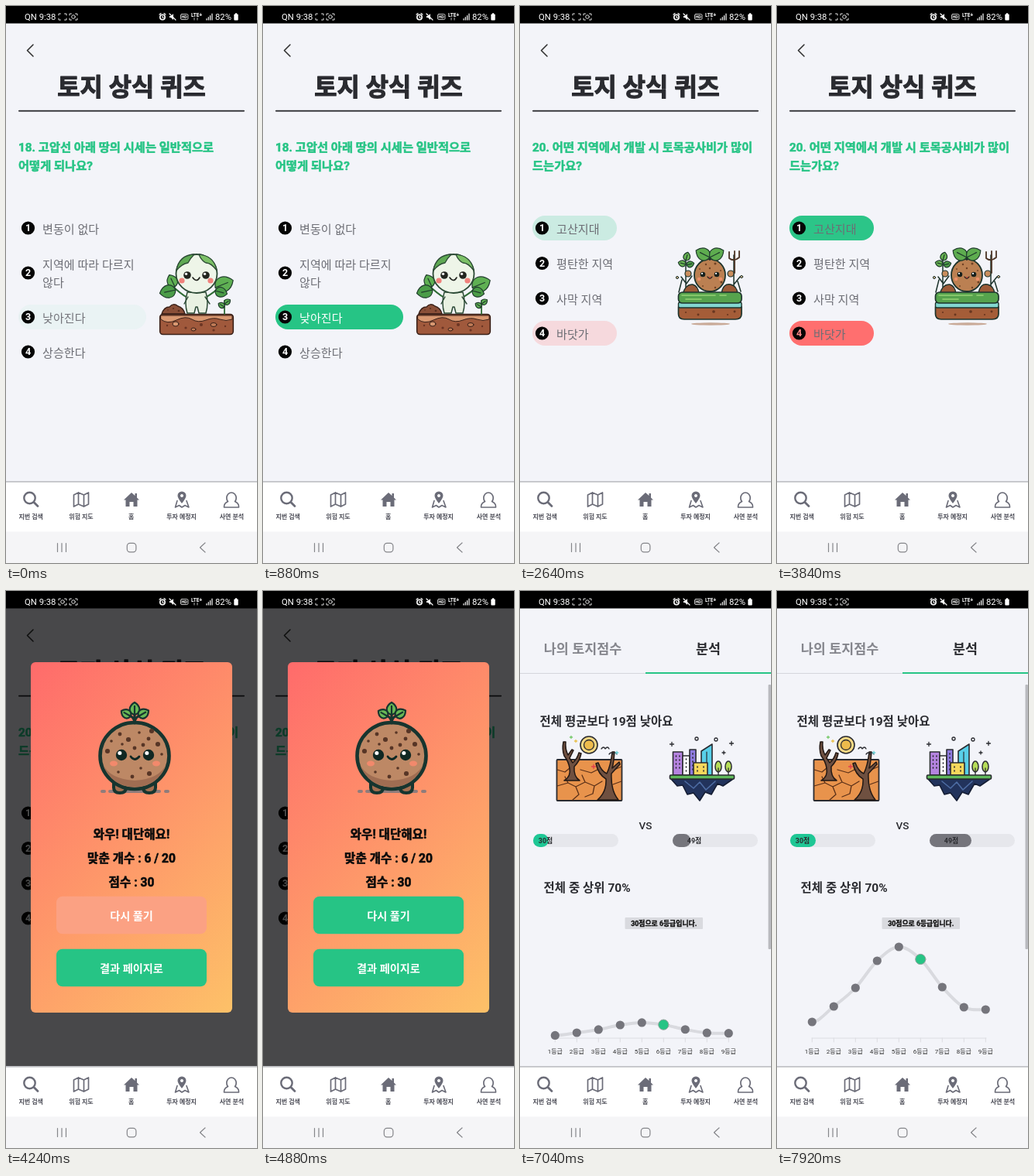
Write an HTML page that moves like this. It is 324x720 px and loops after 8 s.

```html
<!DOCTYPE html>
<html lang="ko">
<head>
<meta charset="utf-8">
<title>토지 상식 퀴즈</title>
<style>
html,body{margin:0;width:100%;height:100%;overflow:hidden;background:#f3f4f9}
svg{display:block;width:100vw;height:100vh}
text{font-family:Roboto,"Noto Sans CJK KR","Noto Sans CJK",sans-serif;white-space:pre}
</style>
</head>
<body>
<svg id="stage" viewBox="0 0 324 720"></svg>
<script>
const GREEN = '#26c485', RED = '#ff6b6b', TEAL = '#1ec795', INK = '#2a2b30', GRAY = '#75757c', BARK = '#3a2119', PINE = '#17352f';
const LOOP = 8000, FADE = 200;
const MODAL_AT = 3920, RESULT_AT = 5200, ANALYSIS_AT = 7000;

const clamp = v => Math.max(0, Math.min(1, v));
const ramp = (t, from, len) => clamp((t - from) / len);
const mix = (a, b, k) => `rgb(${a.map((v, i) => Math.round(v + (b[i] - v) * k))})`;
const $ = id => document.getElementById(id);

// Markup helpers
const paint = (fill, stroke, w) => `fill="${fill || 'none'}"` +
  (stroke ? ` stroke="${stroke}" stroke-width="${w || 1}" stroke-linecap="round" stroke-linejoin="round"` : '');
const path = (d, fill, stroke, w, extra = '') => `<path d="${d}" ${paint(fill, stroke, w)} ${extra}/>`;
const dot = (x, y, r, fill, stroke, w, extra = '') => `<circle cx="${x}" cy="${y}" r="${r}" ${paint(fill, stroke, w)} ${extra}/>`;
const oval = (x, y, rx, ry, fill, stroke, w) => `<ellipse cx="${x}" cy="${y}" rx="${rx}" ry="${ry}" ${paint(fill, stroke, w)}/>`;
const box = (x, y, w, h, r, fill, stroke, sw, extra = '') =>
  `<rect x="${x}" y="${y}" width="${w}" height="${h}" rx="${r}" ${paint(fill, stroke, sw)} ${extra}/>`;
const group = (id, inner, extra = '') => `<g id="${id}" ${extra}>${inner}</g>`;
// Text placed by the vertical middle of its glyphs; weight 800 is bold thickened with a thin outline
const text = (x, mid, s, size, weight, fill, anchor = 'start', extra = '') =>
  `<text x="${x}" y="${mid + size * .38}" font-size="${size}" font-weight="${Math.min(weight, 700)}" text-anchor="${anchor}" ` +
  (fill ? paint(fill, weight === 800 && fill, size * .035) : '') + ` ${extra}>${s}</text>`;
const leaf = (x, y, l, angle, fill, stroke = '#1f3b2c', w = 1.2) =>
  `<g transform="translate(${x} ${y}) rotate(${angle})">` +
  path(`M0 0C${l * .15} ${-l * .55} ${l * .7} ${-l * .5} ${l} 0C${l * .7} ${l * .5} ${l * .15} ${l * .55} 0 0M0 0H${l * .7}`, fill, stroke, w) + '</g>';
const eye = (x, y, r, ink) => dot(x, y, r, ink) + dot(x - r * .3, y - r * .35, r * .35, '#fff');
const specks = (list, r, fill) => list.map(([x, y], i) => dot(x, y, r * (1 + i % 3 * .35), fill)).join('');
const spark = (x, y, r, c) => path(`M${x - r} ${y}h${2 * r}M${x} ${y - r}v${2 * r}`, '', c, 1.3);

// Characters
const leafyKid =
  path('M201 398Q204 389 211 389Q216 383 222 388Q229 390 231 398Z', '#8a4f38', BARK, 1.4) +
  specks([[209, 393], [216, 391], [223, 394]], .8, '#5a2f20') +
  box(198.7, 398.5, 94.6, 26, 4, '#a0593c', BARK, 1.6) +
  path('M200 400H292V405Q284 408 276 405T258 406T240 405T220 406T200 405Z', '#d99871', BARK, 1) +
  specks([[208, 413], [232, 416], [252, 412], [283, 414], [268, 419]], 1.2, '#6b3524') +
  oval(219, 411, 4, 3, '#d99871', BARK) + oval(268, 412, 4, 2.5, '#c27c57', BARK) + oval(242, 418, 3, 2, '#c27c57', BARK) +
  path('M282 398V381', '', '#2f6b35', 1.8) + leaf(282, 389, 9, -150, '#5fb053') + leaf(282, 385, 9, -35, '#5fb053') +
  path('M234 377Q224 371 214 361M257 377Q268 371 277 362', '', '#2f6b35', 2) +
  leaf(218, 363, 17, -115, '#5fb053') + leaf(219, 367, 21, 168, '#4b9c48') +
  leaf(270, 364, 25, -22, '#5fb053') + leaf(270, 368, 16, 15, '#4b9c48') +
  path('M234 370Q230 384 234 397H243L245 389H247L249 397H258Q262 384 258 370Z', '#e9f1e2', '#2c4a35', 1.5) +
  path('M235 376L230 385M257 376L263 385', '', '#2c4a35', 1.4) +
  oval(246, 346, 26.5, 25, '#eef5e8', '#2c4a35', 1.8) +
  path('M220 342Q223 322 243 321Q238 326 235 332Q227 333 220 342Z', '#5fa954', '#2c4a35', 1.3) +
  path('M249 321Q269 323 272 342Q265 332 258 332Q252 329 249 321Z', '#7cc067', '#2c4a35', 1.3) +
  eye(234, 348, 4.8, '#22251f') + eye(258, 348, 4.8, '#22251f') +
  dot(227, 355, 3.6, '#f0827c') + dot(264, 355, 3.6, '#f0827c') + path('M241 351Q246 358 250 351', '', '#22251f', 1.6);

const earthKid =
  path('M233 361Q224 356 215 341M257 361Q268 356 276 341', '', '#4a3524', 1.5) +
  leaf(222, 334, 17, -139, '#49a39a') + leaf(222, 348, 17, -160, '#55b06c') +
  leaf(267, 333, 20, -40, '#c47a43') + leaf(268, 348, 17, -25, '#49a39a') +
  path('M210 380Q206 400 218 400.5H272Q286 400 281 380Z', '#8b4a30', BARK, 1.6) +
  oval(222, 389, 5, 3.5, '#b9744e', BARK) + oval(262, 385, 5, 3.5, '#c98a62', BARK) + oval(244, 393, 4, 2.5, '#b9744e', BARK) +
  specks([[233, 387], [252, 394], [272, 392], [215, 395]], 1, '#4f2618') +
  path('M207 374Q207 368 213 368H277Q283 368 283 374Q284 383 277 380Q272 376 267 381Q261 385 256 379Q249 376 244 381Q237 385 232 379Q226 376 221 381Q207 386 207 374Z', '#69bd4d', '#24401f', 1.5) +
  path('M211 371H275', '', '#a2dc73', 1.6) +
  path('M234 355V368H242V364H247V368H255V355Z', '#d9a47b', BARK, 1.4) + path('M233 358L227 363M256 358L262 363', '', BARK, 1.5) +
  box(226, 323.5, 38, 34, 15, '#e8b990', BARK, 1.6) +
  specks([[233, 331], [256, 329], [245, 327], [259, 350]], .7, '#b07d57') +
  eye(235, 341, 3.4, '#23170f') + eye(254, 341, 3.4, '#23170f') +
  dot(231, 347, 2.5, '#ef9a78') + dot(259, 347, 2.5, '#ef9a78') + path('M241 344Q245 349 248 344', '#933', '#23170f', 1.2);

const spudKid =
  oval(246, 411, 25, 1.7, '#c9aa98') +
  path('M214 372V326M208 350L214 358M222 349L214 360M276 372V322M284 350L276 360M205 370L209 354M285 369L281 356', '', '#1d332c', 1.5) +
  leaf(214, 334, 10, -165, '#69b552') + leaf(214, 329, 11, -75, '#69b552') + leaf(215, 335, 10, -15, '#4d9d48') +
  path('M270 318V326Q276 331 283 325V317M277 317V345', '', '#4b3324', 1.8) +
  dot(217, 346, 4, '#c98d5d', '#1d332c', 1.2) + dot(272, 346, 4, '#c98d5d', '#1d332c', 1.2) +
  dot(203, 351, 1.6, '#d8b793', '#1d332c') + dot(286, 350, 1.6, '#d8b793', '#1d332c') +
  path('M210 372Q214 359 223 360Q230 362 231 372ZM260 372Q262 358 272 360Q280 362 281 372Z', '#9c5a38', '#1d332c', 1.4) +
  oval(245, 348, 20, 21, '#bb8052', '#1d332c', 1.8) +
  specks([[232, 340], [240, 334], [252, 333], [259, 342], [245, 339], [260, 357], [236, 362], [252, 364]], .9, '#704225') +
  eye(236, 347, 3.3, '#18211d') + eye(254, 347, 3.3, '#18211d') +
  dot(231, 353, 2.3, '#ec8f69') + dot(259, 353, 2.3, '#ec8f69') + path('M242 350Q245 355 248 350', '#b04b3d', '#18211d', 1.2) +
  path('M245 328V321', '', '#1d332c', 2) + leaf(245, 325, 20, -153, '#5eac4f') + leaf(245, 325, 20, -27, '#5eac4f') +
  path('M204.5 389H286V398Q286 405 278 405H212Q204.5 405 204.5 398Z', '#a55d38', '#1d332c', 1.7) +
  specks([[214, 396], [230, 399], [250, 395], [268, 399], [277, 395]], 1.1, '#683620') +
  box(204.5, 383, 81.5, 7, 2, '#83d8d0', '#1d332c', 1.4) +
  box(204.5, 370, 81.5, 14, 5, '#56a34d', '#1d332c', 1.7) + path('M209 374H252M258 374H266M214 379H234', '', '#95d274', 1.6);

const trophyKid =
  path('M124 259H127M134 259H198M206 259H209', '', '#8f7c7b', 4) +
  path('M139 240V254Q139 261 147 261Q155 261 155 254V240ZM177 240V254Q177 261 185 261Q193 261 193 254V240Z', '#a36e50', PINE, 4) +
  oval(166, 213, 44.5, 43, '#bd8865', PINE, 4.6) +
  path('M125 224Q136 253 166 253.5Q196 253 207 224Q198 243 166 245Q134 243 125 224Z', '#a06d52') +
  specks([[136, 194], [147, 185], [158, 192], [172, 183], [184, 191], [196, 198], [150, 198], [177, 199], [131, 207], [201, 211], [166, 203], [188, 181], [145, 234], [163, 240], [185, 236], [174, 229]], 1.8, '#573526') +
  eye(149, 212, 7.2, '#102823') + eye(184, 212, 7.2, '#102823') +
  oval(139, 223, 5, 3.4, '#f2896c') + oval(194, 223, 5, 3.4, '#f2896c') + path('M161 214Q166 221 172 214', '', '#102823', 2.8) +
  path('M166 171V158M166 169Q164 162 159 161M166 169Q168 162 173 161', '', PINE, 3.2) +
  leaf(166, 160, 16, -90, '#68b956', PINE, 2.2) + leaf(161, 162, 14, -150, '#68b956', PINE, 2.2) + leaf(171, 162, 15, -30, '#68b956', PINE, 2.2);

const seedling =
  oval(162, 254.5, 17, 6, '#dba184', '#111', 1.8) + specks([[154, 256], [166, 257], [172, 254]], .8, '#9a5d41') +
  path('M162 253V239', '', '#111', 2) + leaf(162, 243, 20, -136, '#8fd451', '#111', 1.8) + leaf(162, 244, 18, -41, '#a4de6a', '#111', 1.8);

// Scenery
const trunk = d => path(d, '#6f5040', '#221814', 1.5);
const desert =
  box(47.5, 218, 84, 53, 1, '#e8934c', INK, 1.8) +
  dot(89, 199, 11, '#f6d984', INK, 1.6) + dot(89, 199, 6.5, '#edbb4c', INK, 1.3) +
  path('M48 231L58 234L64 229M78 231L92 235L104 229M124 230L131 227M48 252L62 248L72 253L84 247L96 252L106 246M62 248L58 240M84 247L80 238M96 252L94 262L84 266M72 253L76 263L68 270M120 250L131 246', '', '#5b3018', 1.3) +
  trunk('M57 245Q66 240 64 229Q63 221 57 213Q54 205 56 195L59 195Q58 204 62 212L67 205L69 206L64 216L68 222Q74 217 76 209L79 210Q77 220 70 227Q69 240 77 245Z') +
  trunk('M100 270Q112 260 111 243Q101 237 98 223L101 222Q105 233 112 236Q117 226 119 208L122 208Q121 222 119 229L128 221L129 224L118 236Q117 258 127 270Z') +
  path('M105 204Q108 200 110 204Q113 200 115 204M115 211Q118 207 120 211Q123 207 125 211', '', INK, 1.3) +
  spark(66, 189, 1.6, '#77c96b') + spark(72, 194, 1.6, '#e9c04a') + spark(95, 227, 2.5, '#e33f4d') + spark(125, 209, 1.8, '#69cfd4');

const tower = (x, y, w, fill) => box(x, y, w, 238 - y, 0, fill, INK, 1.6);
const windows = (x, y, n, c = INK) => path(`M${x} ${y}v${n * 4}`, '', c, 1.6, 'stroke-dasharray="1 4"');
const city =
  path('M195 243H275L262 252L255 249L247 263L239 260L232 271L224 261L216 263L210 251L203 252Z', '#22335c', '#151d33', 1.6) +
  path('M213 246L224 255L232 247L240 257L252 246', '', '#4d6ca3', 1.6) +
  tower(197.5, 208, 12.5, '#b583e0') + windows(201.5, 213, 5) + windows(206, 213, 5) +
  tower(210, 213, 9, '#fff') + windows(214.5, 217, 4) +
  tower(219, 205, 8, '#8f7be0') + windows(223, 210, 6) +
  path('M234 238V207L248 198V238Z', '#58cfe8', INK, 1.6) + path('M241 208V234', '', INK, 1.2) +
  tower(224, 222, 18, '#f7d85c') + windows(229, 227, 2) + windows(237, 227, 2) +
  oval(256, 227, 4, 7, '#b6dd58', INK, 1.5) + oval(269, 227, 4, 7, '#b6dd58', INK, 1.5) +
  path('M256 238V229M269 238V229', '', INK, 1.3) + box(193.5, 238, 83, 5, 1, '#5fb95a', INK, 1.6) +
  spark(196, 198, 2.5, INK) + spark(273, 197, 2.5, INK) + spark(263, 209, 2, INK) + dot(228, 191, 2, '', INK, 1.3) + dot(253, 192, 2, '', INK, 1.3);

// Quiz data: marks are [row, colour]; on/off bound the time the answer is shown
const quiz = [
  { lines: ['18. 고압선 아래 땅의 시세는 일반적으로', '어떻게 되나요?'], art: leafyKid, from: 0, on: -8, off: 1080, w: 165,
    rows: [287, 345, 402, 447], options: [['변동이 없다'], ['지역에 따라 다르지', '않다'], ['낮아진다'], ['상승한다']], marks: [[2, GREEN]] },
  { lines: ['19. 지적도를 확인할 때 무엇을 가장 먼저', '확인해야 합니까?'], art: earthKid, from: 1080, on: 1390, off: 2480, w: 137,
    rows: [287, 332.5, 378, 423], options: [['지목과 지적현상'], ['토지의 면적'], ['인근 건축물'], ['토지의 경계']], marks: [[0, GREEN], [3, RED]] },
  { lines: ['20. 어떤 지역에서 개발 시 토목공사비가 많이', '드는가요?'], art: spudKid, from: 2480, on: 2820, off: 3835, w: 109,
    rows: [287, 332.5, 378, 423], options: [['고산지대'], ['평탄한 지역'], ['사막 지역'], ['바닷가']], marks: [[0, GREEN], [3, RED]] }
];
const marks = quiz.flatMap((q, n) => q.marks.map(([row, color], i) => ({ n, row, color, id: `mark${n}${i}` })));

const optionRow = (q, n, i) => {
  const y = q.rows[i], parts = q.options[i];
  return dot(28.5, y, 8.6, '#050505') +
    text(28.5, y - .3, i + 1, 12.5, 700, '#fff', 'middle', `id="num${n}${i}"`) +
    group(`opt${n}${i}`, parts.map((s, k) => text(47, y + 1 + (k - (parts.length - 1) / 2) * 23.5, s, 15.1, 400)).join(''), 'fill="#6d6e75"');
};
const question = (q, n) => group('quiz' + n,
  q.lines.map((s, k) => text(16, 182 + 24 * k, s, 15.3, 800, GREEN)).join('') +
  q.options.map((_, i) => optionRow(q, n, i)).join('') + q.art);

const quizPage = group('quizPage',
  path('M35 50L27.5 57.5L35 65', '', '#333', 1.6) +
  text(162, 104, '토지 상식 퀴즈', 31.8, 800, INK, 'middle') + box(16, 134.7, 292, 1.8, .9, '#222327') +
  marks.map(m => box(16, 0, 0, 32, 16, m.color, '', 0, `id="${m.id}"`)).join('') +
  group('touch', box(16, 407, 137, 32, 16, '#4a6a80', '', 0, 'fill-opacity=".18"') + dot(78, 410, 7, '', '#f3c3cb', .8)) +
  quiz.map(question).join(''));

const modal = group('modal',
  box(0, 22, 324, 593, 0, '#000', '', 0, 'fill-opacity=".7"') +
  box(32, 92, 260, 453, 6, 'url(#sunset)') + trophyKid +
  ['와우! 대단해요!', '맞춘 개수 : 6 / 20', '점수 : 30'].map((s, i) => text(162, 314 + 31 * i, s, 15.6, 800, '#0c0c0c', 'middle')).join('') +
  box(65, 394.7, 194, 48.6, 8, '#fba183') + box(65, 394.7, 194, 48.6, 8, GREEN, '', 0, 'id="retry"') + box(65, 462.7, 194, 48.6, 8, GREEN) +
  text(162, 420, '다시 풀기', 14.2, 700, '#fff', 'middle') + text(162, 488, '결과 페이지로', 14.2, 700, '#fff', 'middle'));

const arc = 'M94.5 267A67.5 67.5 0 0 1 229.5 267';
const ARC_LEN = Math.PI * 67.5;
const tabs = active => box(0, 106, 324, 1, 0, '#d4d6dc') + box(active * 162, 105, 162, 2, 0, GREEN) +
  ['나의 토지점수', '분석'].map((s, i) => text(81 + 162 * i, 74, s, 17.4, 700, i === active ? INK : '#85868d', 'middle')).join('');

const resultPage = group('resultPage', tabs(0) +
  path(arc, '', '#ebebec', 17) + path(arc, '', TEAL, 17, 'id="gauge"') + seedling +
  text(162, 301, '30 점', 19, 700, INK, 'middle') + text(162, 331.5, '상위 70%', 12, 400, '#333', 'middle') +
  box(16, 367.5, 292, 39, 6, '#e7e8ed') + text(162, 387.5, '토지 구매 상식 더 공부하러 가기', 9.2, 800, GREEN, 'middle') +
  box(16, 420, 292, 39.5, 6, GREEN) + text(162, 440, '토지 상식 퀴즈 다시 풀어보기', 9.1, 800, '#fff', 'middle'));

const grades = [557, 537, 513, 478, 460, 476, 512, 538, 541];
const gradeX = i => 45.3 + 28 * i;
const meter = (x, label, labelX, color, id) => box(x, 314, 110, 17, 8.5, '#e6e7ec') +
  box(x, 314, 17, 17, 8.5, color, '', 0, `id="${id}"`) + text(labelX, 322.5, label, 8.9, 700, '#2b2c30', 'middle');
const gradeDot = i => i === 5 ? dot(0, 0, 6.6, GREEN, '#8fa39b', 1, `id="grade${i}"`) : dot(0, 0, 5.6, GRAY, '', 0, `id="grade${i}"`);

const analysisPage = group('analysisPage', tabs(1) +
  text(25.5, 168, '전체 평균보다 19점 낮아요', 15.5, 700, INK) + desert + city +
  text(162, 303, 'VS', 13.5, 500, INK, 'middle') +
  meter(17, '30점', 33, TEAL, 'mine') + meter(197, '49점', 225, GRAY, 'mean') +
  text(30.5, 383, '전체 중 상위 70%', 15.5, 700, INK) +
  path('M45 578H270' + grades.map((_, i) => `M${gradeX(i)} 578v5`).join(''), '', '#dcdde2', 1) +
  grades.map((_, i) => text(gradeX(i), 595, `${i + 1}등급`, 8, 400, '#333', 'middle')).join('') +
  path('', '', '#d9dadf', 4, 'id="curve"') + grades.map((_, i) => gradeDot(i)).join('') +
  box(135.5, 422, 100.5, 15, 1, '#d9dadf') + text(185.7, 429.5, '30점으로 6등급입니다.', 8.85, 800, '#111', 'middle') +
  box(320.5, 121, 3.5, 342, 1, '#b9babf'));

const corners = (x, id) => path(`M${x} 12v-2h2.5M${x + 7.5} 10h2.5v2M${x + 10} 16v2h-2.5M${x + 2.5} 18h-2.5v-2`, '', '#ddd', 1) +
  group(id, dot(x + 5, 14, 2.3, '', '#ddd', 1));
const statusBar = box(0, 0, 324, 22.5, 0, '#000') +
  text(24, 13.8, 'QN 9:38', 11.3, 400, '#fff') + corners(68, 'blink') + corners(82, 'steady') +
  dot(202, 14.5, 3.2, '', '#fff', 1.6) + path('M198 11l2-1.5M206 11l-2-1.5M202 13v2h1.5', '', '#fff', 1.2) +
  path('M211 13h2l3-3v8l-3-3h-2z', '#fff') + path('M211 10l8 8', '', '#fff', 1.2) +
  box(225.5, 10.5, 9.5, 7, 1.5, '', '#ddd', .9) + text(230.2, 14, 'HD', 5.5, 700, '#fff', 'middle') +
  text(246, 11.5, 'LTE+', 6.5, 700, '#fff', 'middle') + path('M243 18v-2.5M247 15.5v2.5', '', '#bbb', 1) +
  path('M259 18v-1.5M261.3 18v-3.5M263.6 18v-5.5M266 18v-8', '', '#fff', 1.2) +
  text(270, 13.8, '82%', 11.3, 400, '#fff') + box(294.3, 10.5, 5.4, 8, 1, '#fff') + box(295.8, 9.3, 2.4, 2, 0, '#fff');

const ICON = '#6b6c78';
const navBar = box(0, 614, 324, 66, 0, '#fff') + box(0, 614, 324, 1.8, 0, '#c3c4c8') + box(0, 679.5, 324, 41, 0, '#f5f5f7') +
  dot(30.5, 636, 7.2, '', ICON, 2.4) + path('M36 641.5L41 646.5', '', ICON, 2.8) +
  path('M87.5 632L93.5 629V644L87.5 647ZM93.5 629L100.5 632V647L93.5 644M100.5 632L106.5 629V644L100.5 647', '', ICON, 1.7) +
  path('M152 638.5L162 629L166.5 633V630H169V635.5L172 638.5H169.5V647H164.5V641H159.5V647H154.5V638.5Z', ICON) +
  path('M227 643Q221.5 636 221.5 633A5.5 5.5 0 0 1 232.5 633Q232.5 636 227 643ZM227 631a2 2 0 1 0 .01 0Z', ICON, '', 0, 'fill-rule="evenodd"') +
  path('M221 639.5L218.5 648L223.5 645.5L227 648L231 645.5L236 648L233 639.5', '', ICON, 1.6) +
  path('M286.5 640.5A6.2 6.8 0 1 1 295.5 640.5Q301 643 300.5 648H281.5Q281 643 286.5 640.5Z', '', ICON, 1.7) +
  ['지번 검색', '위험 지도', '홈', '투자 예정지', '사연 분석'].map((s, i) => text(32.2 + 64.8 * i, 660, s, 8, 700, '#4c4d57', 'middle')).join('') +
  path('M66.5 694.5V705.5M72 694.5V705.5M77.5 694.5V705.5M257 694L250.5 700L257 706', '', '#85868a', 1.2) +
  box(156.3, 694.3, 11.6, 11.6, 3.8, '', '#85868a', 1.2);

$('stage').innerHTML =
  '<defs><linearGradient id="sunset" gradientUnits="userSpaceOnUse" x1="-16" y1="140" x2="340" y2="497">' +
  '<stop offset="0" stop-color="#ff6b6b"/><stop offset="1" stop-color="#fdc168"/></linearGradient></defs>' +
  box(0, 0, 324, 720, 0, '#f3f4f9') + quizPage + modal + resultPage + analysisPage + statusBar + navBar;

const show = (id, on) => $(id).style.display = on ? '' : 'none';
const easeOut = k => 1 - (1 - k) ** 4;

function drawQuiz(t) {
  const current = quiz.findLastIndex(q => t >= q.from);
  quiz.forEach((_, n) => show('quiz' + n, n === current));
  for (const m of marks) {
    const q = quiz[m.n], layout = quiz[current], pill = $(m.id);
    const level = ramp(t, q.on, FADE) - ramp(t, q.off, FADE);
    pill.setAttribute('y', layout.rows[m.row] - 16);
    pill.setAttribute('width', layout.w);
    pill.setAttribute('fill-opacity', level);
    const lit = t < q.off ? level : 0;
    $(`opt${m.n}${m.row}`).setAttribute('fill', mix([109, 110, 117], [255, 255, 255], lit));
    if (m.color === RED) $(`num${m.n}${m.row}`).setAttribute('fill', mix([255, 255, 255], [255, 135, 135], level));
  }
  show('touch', t >= 1390 && t < 1700);
}

function drawAnalysis(t) {
  const k = easeOut(ramp(t, ANALYSIS_AT, 900));
  $('mine').setAttribute('width', 17 + 16 * k);
  $('mean').setAttribute('width', 17 + 37 * k);
  const ys = grades.map(y => 578 + (y - 578) * k);
  let d = `M${gradeX(0)} ${ys[0]}`;
  ys.forEach((y, i) => {
    $('grade' + i).setAttribute('cx', gradeX(i));
    $('grade' + i).setAttribute('cy', y);
    if (!i) return;
    const slope = j => j > 0 && j < 8 ? (ys[j + 1] - ys[j - 1]) / 6 : 0;
    d += `C${gradeX(i) - 18.7} ${ys[i - 1] + slope(i - 1)} ${gradeX(i) - 9.3} ${y - slope(i)} ${gradeX(i)} ${y}`;
  });
  $('curve').setAttribute('d', d);
}

function draw(t) {
  show('quizPage', t < RESULT_AT);
  show('modal', t >= MODAL_AT && t < RESULT_AT);
  show('resultPage', t >= RESULT_AT && t < ANALYSIS_AT);
  show('analysisPage', t >= ANALYSIS_AT);
  show('blink', t % 1000 >= 200 && t % 1000 < 440);
  $('modal').setAttribute('opacity', ramp(t, MODAL_AT, 160));
  $('retry').setAttribute('opacity', ramp(t, 4260, 240));
  const sweep = .3 * ramp(t, 5520, 800) * ARC_LEN;
  $('gauge').setAttribute('stroke-dasharray', `${sweep} 999`);
  $('gauge').setAttribute('opacity', sweep > 0 ? 1 : 0);
  if (t < RESULT_AT) drawQuiz(t);
  if (t >= ANALYSIS_AT) drawAnalysis(t);
}

const start = performance.now();
function tick() {
  draw((performance.now() - start) % LOOP);
  requestAnimationFrame(tick);
}
tick();
</script>
</body>
</html>
```
